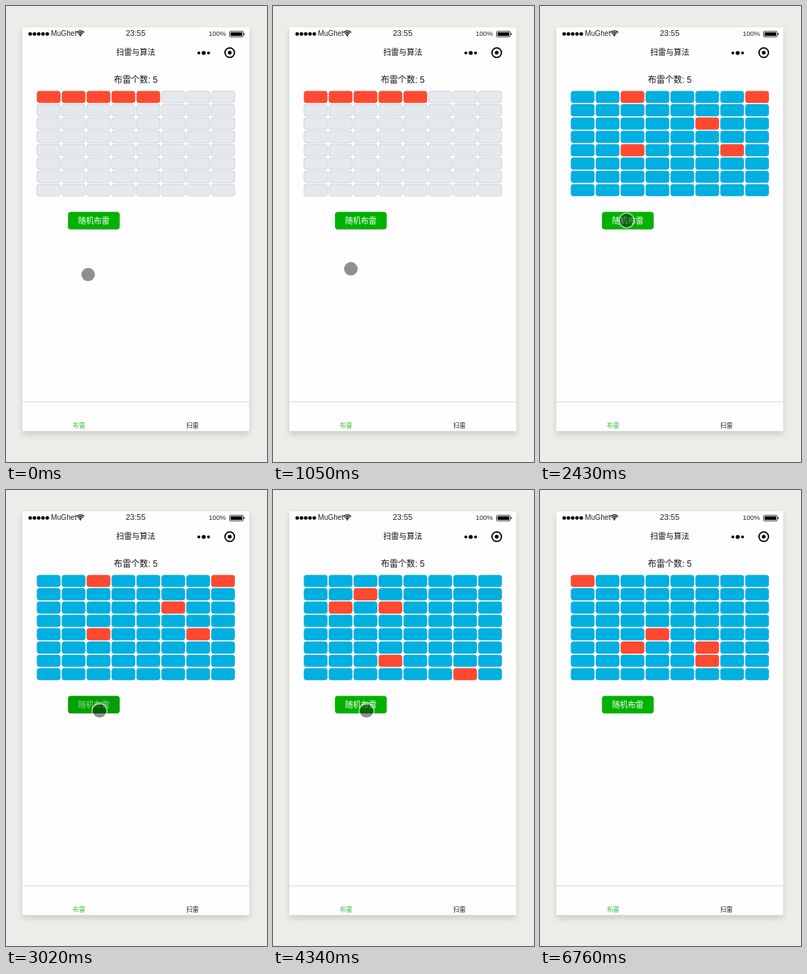
An HTML page with a canvas for the animation above (7510 ms loop, 367 px wide and 641 px high).

```html
<!DOCTYPE html>
<html lang="zh-CN">
<head>
<meta charset="utf-8">
<title>扫雷与算法</title>
<style>
  html, body { margin: 0; width: 100%; height: 100%; overflow: hidden; background: #ecede8; }
  canvas { display: block; width: 367px; height: 641px; }
</style>
</head>
<body>
<canvas id="stage" width="367" height="641"></canvas>
<script>
const ctx = document.getElementById('stage').getContext('2d');
const LOOP = 7510;
const FONT = '"Liberation Sans", "Noto Sans CJK SC", "Noto Sans CJK", sans-serif';
const RED = '#ff4a31', BLUE = '#00b0e0', GREY = '#e5e8ed';

// Each board: press time, reveal time, mines as row-column pairs
const boards = [
  { press: -1, show: 0, mines: '00 01 02 03 04' },
  { press: 1630, show: 1690, mines: '02 07 25 42 46' },
  { press: 3020, show: 3080, mines: '01 02 32 40 61' },
  { press: 4280, show: 4340, mines: '12 21 23 63 76' },
  { press: 5150, show: 5240, mines: '26 33 51 70 75' },
  { press: 5840, show: 5900, mines: '04 16 32 55 61' },
  { press: 6430, show: 6490, mines: '00 43 52 55 65' }
];

// Pointer keyframes: time, x, y
const path = [
  [390, 115.5, 377.5], [500, 95, 270], [590, 89.5, 150], [670, 130, 88],
  [740, 180, 78.5], [800, 199.5, 110], [880, 180, 200], [970, 125, 325],
  [1050, 109.5, 369.5], [1140, 110.5, 363.5], [1390, 131.5, 310.5],
  [2170, 131.5, 310.5], [2310, 158.5, 233.5], [2430, 121.7, 301.5],
  [2660, 131.5, 310.5], [3060, 131.5, 310.5], [3250, 135, 379],
  [3680, 135, 379], [3720, 135.5, 372.5], [4070, 131.5, 310.5],
  [6490, 131.5, 310.5], [6650, 205, 431]
];
const POINTER_GONE = 6760;

function pointerAt(t) {
  const i = path.findIndex(key => key[0] > t);
  if (i === 0) return path[0].slice(1);
  if (i < 0) return path[path.length - 1].slice(1);
  const [t0, x0, y0] = path[i - 1], [t1, x1, y1] = path[i];
  const k = (t - t0) / (t1 - t0);
  return [x0 + (x1 - x0) * k, y0 + (y1 - y0) * k];
}

function roundRect(x, y, w, h, r, fill, stroke) {
  ctx.beginPath();
  ctx.roundRect(x, y, w, h, r);
  if (fill) { ctx.fillStyle = fill; ctx.fill(); }
  if (stroke) { ctx.strokeStyle = stroke; ctx.stroke(); }
}

function disc(x, y, r, color) {
  ctx.beginPath();
  ctx.arc(x, y, r, 0, Math.PI * 2);
  ctx.fillStyle = color;
  ctx.fill();
}

function ring(x, y, r, width, color, from = 0, to = Math.PI * 2) {
  ctx.beginPath();
  ctx.arc(x, y, r, from, to);
  ctx.lineWidth = width;
  ctx.strokeStyle = color;
  ctx.stroke();
}

function label(text, x, y, size, color, align = 'center') {
  ctx.font = `${size}px ${FONT}`;
  ctx.textAlign = align;
  ctx.fillStyle = color;
  ctx.fillText(text, x, y);
}

function drawPhone() {
  ctx.fillStyle = '#ecede8';
  ctx.fillRect(0, 0, 367, 641);
  ctx.save();
  ctx.shadowColor = 'rgba(0,0,0,.14)';
  ctx.shadowBlur = 8;
  ctx.shadowOffsetY = 4;
  ctx.fillStyle = '#fefefe';
  ctx.fillRect(23, 30, 319, 567.5);
  ctx.restore();
  ctx.fillStyle = '#d9d9d9';
  ctx.fillRect(23, 556, 319, 1);
}

function drawStatusBar() {
  for (let i = 0; i < 5; i++) disc(34 + i * 6, 39.3, 2.5, '#000');
  label('MuGhet', 63.3, 42.3, 10.1, '#222', 'left');
  for (const r of [2.6, 5, 7.4])
    ring(104.5, 42.3, r, 1.4, '#000', -Math.PI * 0.76, -Math.PI * 0.24);
  disc(104.5, 41.8, 1, '#000');
  label('23:55', 182.3, 42.2, 11.1, '#222');
  label('100%', 285, 42.3, 9.5, '#222', 'left');
  ctx.lineWidth = 0.8;
  roundRect(314.4, 35.6, 19, 7.8, 1.2, null, '#000');
  roundRect(315.8, 37, 16.2, 5, 0.5, '#000');
  roundRect(334.3, 38.2, 1.4, 2.6, 0.7, '#000');
}

function drawHeader() {
  label('扫雷与算法', 182.5, 69.2, 11, '#111');
  disc(271.2, 66, 2.1, '#000');
  disc(278, 66, 2.8, '#000');
  disc(284.8, 66, 2.1, '#000');
  ring(314.6, 65.6, 6.7, 1.8, '#000');
  disc(314.6, 65.6, 2.7, '#000');
  label('布雷个数: 5', 182.5, 107.6, 12, '#111');
}

function drawBoard(board) {
  const mines = board.mines.split(' ');
  const safe = board.press < 0 ? GREY : BLUE;
  ctx.lineWidth = 0.6;
  for (let row = 0; row < 8; row++)
    for (let col = 0; col < 8; col++) {
      const fill = mines.includes(`${row}${col}`) ? RED : safe;
      const edge = fill === GREY ? 'rgba(0,0,0,.2)' : 'rgba(0,0,0,.13)';
      roundRect(43.4 + col * 35.03, 119.4 + row * 18.72, 33.2, 16.9, 4, fill, edge);
    }
}

function drawButton(pressed) {
  ctx.lineWidth = 0.6;
  roundRect(87.2, 289.4, 72.6, 24.6, 4, pressed ? '#00a000' : '#00b200', 'rgba(0,0,0,.15)');
  label('随机布雷', 123.5, 305.6, 11, pressed ? 'rgba(255,255,255,.6)' : '#fff');
}

function drawPointer(t) {
  if (t >= POINTER_GONE) return;
  const [x, y] = pointerAt(t);
  disc(x, y, 9.6, 'rgba(0,0,0,.43)');
  ring(x, y, 10.5, 1.8, 'rgba(255,255,255,.5)');
}

function draw(t) {
  drawPhone();
  drawStatusBar();
  drawHeader();
  drawBoard(boards.filter(b => b.show <= t).pop());
  drawButton(boards.some(b => b.press >= 0 && t >= b.press && t < b.show));
  label('布雷', 102.8, 592.8, 8.7, '#2fc13a');
  label('扫雷', 262.3, 592.8, 8.7, '#222');
  drawPointer(t);
}

const start = performance.now();
function tick() {
  draw((performance.now() - start) % LOOP);
  requestAnimationFrame(tick);
}
tick();
</script>
</body>
</html>
```
